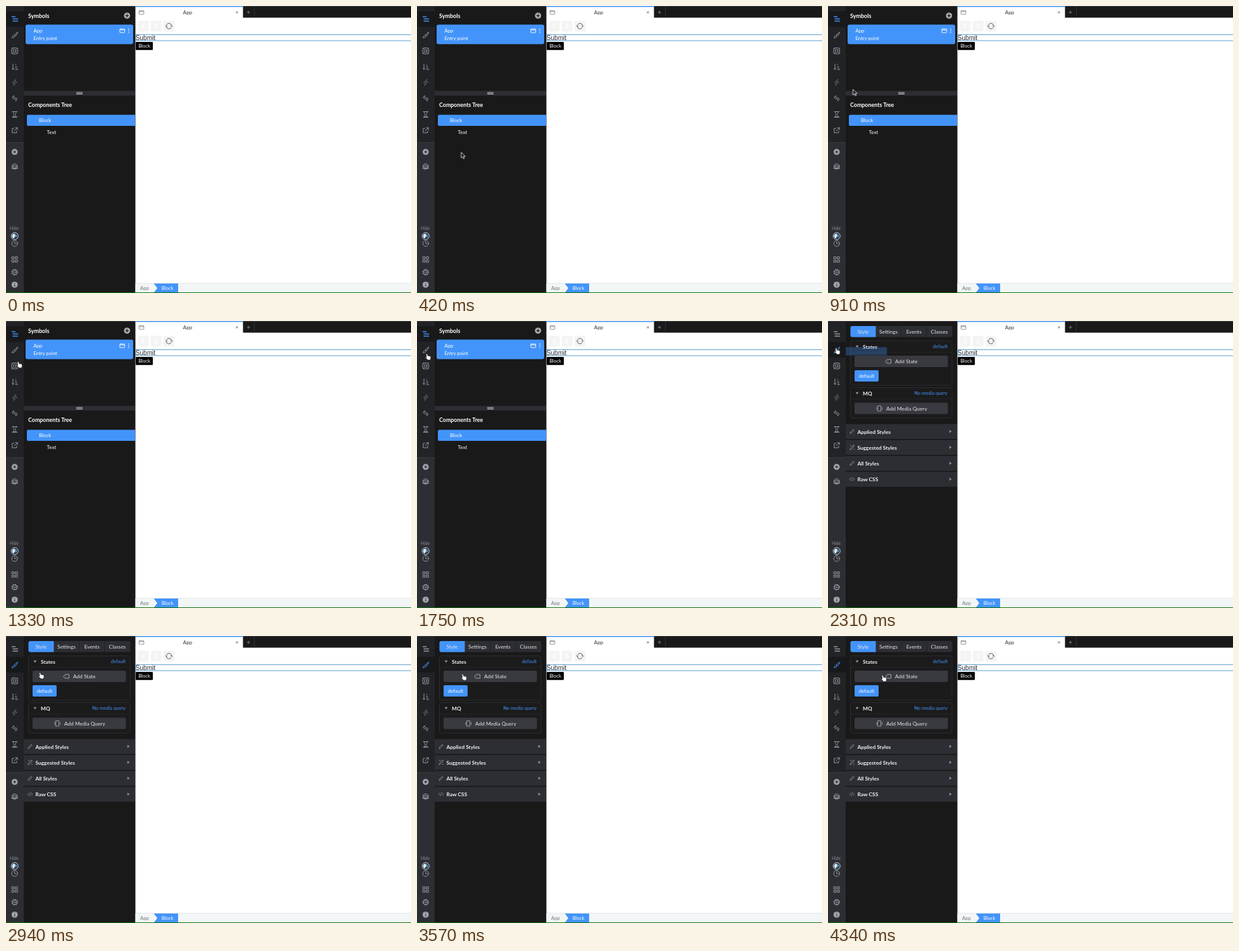
An HTML page that plays this animation: 640x455 px, repeating every 4410 ms.

```html
<!DOCTYPE html>
<html lang="en">
<head>
<meta charset="utf-8">
<title>App builder</title>
<style>
  html, body { margin: 0; width: 100%; height: 100%; overflow: hidden; background: #191919; }
  svg { display: block; width: 640px; height: 455px; }
  text { font: 8px Lato, sans-serif; fill: #fff; }
  .h { font-size: 9px; font-weight: 700; }
  .b { font-size: 8.35px; font-weight: 700; fill: #f2f2f2; }
  .s { font-size: 7.7px; }
  .m { font-size: 8.3px; fill: #e6e6e8; }
  .mid { text-anchor: middle; }
  .link { font-size: 7.55px; fill: #4394fa; text-anchor: end; }
  .blue { fill: #4394fa; }
  .bar { fill: #2d2e33; }
  .btn { fill: #393a40; }
  .box { fill: #1b1b1c; stroke: #2c2d31; }
  .dim { fill: #8b8d94; }
  .line { fill: none; stroke: currentColor; stroke-linecap: round; stroke-linejoin: round; }
  .icons { color: #989aa1; }
  .on { color: #4394fa; }

  .tree, .style, .ghost, .arrow, .hand, .pointer { animation: 4.41s infinite; }
  .tree, .style, .ghost, .arrow, .hand { animation-timing-function: step-end; }
  .tree { animation-name: tree; }
  .style { animation-name: style; }
  .ghost { animation-name: ghost; }
  .arrow { animation-name: arrow; }
  .hand { animation-name: hand; }
  .pointer { animation-name: move; animation-timing-function: ease-in-out; }

  @keyframes tree { 0% { visibility: visible } 52.37%, 100% { visibility: hidden } }
  @keyframes style { 0% { visibility: hidden } 52.37%, 100% { visibility: visible } }
  @keyframes ghost { 0% { opacity: 0 } 52.37% { opacity: .3 } 53.95% { opacity: .1 } 55.54%, 100% { opacity: 0 } }
  @keyframes arrow { 0% { visibility: hidden } 1.58% { visibility: visible } 23.8%, 100% { visibility: hidden } }
  @keyframes hand { 0% { visibility: hidden } 23.8%, 100% { visibility: visible } }
  @keyframes move {
    0%, 1.58% { transform: translate(86px, 268px) }
    9.52%, 12.7% { transform: translate(69.8px, 231.8px) }
    27%, 32% { transform: translate(19px, 64.5px) }
    46%, 57% { transform: translate(12.5px, 43px) }
    66.67%, 70% { transform: translate(53.5px, 58px) }
    90.4%, 100% { transform: translate(86px, 62.3px) }
  }
</style>
</head>
<body>
<svg viewBox="0 0 640 455">
  <defs>
    <g id="list" class="line" stroke-width="1.4"><path d="M9.5 17h5M11 20.5h7.5M11 24h7.5"/></g>
    <g id="brush" class="line">
      <path d="M18 41.5l-5 4.5 1.8 1.8 3.6-5.2zM12.5 46.5c-2 0-1.500 2.500-3.500 3.500 2.500.800 5 0 5-2"/>
    </g>
    <g id="window" class="line" stroke-width=".9"><rect x="-3.8" y="-2.900" width="7.600" height="5.800" rx=".7"/><path d="M-3.500-1.300h7"/></g>
    <path id="down" d="M-2.500-1.700h5L0 2z" fill="#8b8d94"/>
    <path id="right" d="M-1.700-2.500v5L2 0z" fill="#8b8d94"/>
    <path id="pen" class="line" stroke-width=".9" d="M-3 3l.7-2.200L2-3.200 3.200-2-1 2.300z"/>
  </defs>

  <!-- side bar -->
  <rect width="640" height="455" fill="#191919"/>
  <rect width="28" height="216" fill="#222327"/>
  <rect y="217" width="28" height="237" class="bar"/>
  <path d="M0 216.500h28" stroke="#3a3b40"/>

  <g class="tree icons">
    <rect y="8" width="28" height="25" fill="#18191b"/>
    <use href="#list" class="on"/>
    <use href="#brush"/>
  </g>
  <g class="style icons">
    <rect y="33" width="28" height="25" fill="#18191b"/>
    <use href="#list"/>
    <use href="#brush" class="on"/>
  </g>

  <g class="icons line">
    <rect x="9" y="66.500" width="9.400" height="9.400" rx="2"/>
    <circle cx="13.700" cy="71.200" r="2.200"/>
    <path d="M9.500 67l2.600 2.600M18 67l-2.600 2.600M9.500 75.500l2.600-2.600M18 75.500l-2.600-2.600" stroke-width=".8"/>
    <path d="M11 92v8.500M9.300 99l1.700 1.700 1.700-1.700M15 92.500h.5M15 95.500h1.500M15 98h2.500M15 100.700h3.500"/>
    <path d="M15.500 116.500l-5.500 5.300h3.300l-1.500 4.400 5.700-5.700h-3.300z" stroke="#65676d" stroke-width=".9"/>
    <path d="M12.500 142l-3 3 3 2.500M15 145l3 2.500-3 3M11.500 142.500l4.500 7.500"/>
    <path d="M9.800 167.500h8M9.800 176.300h8M11.500 168c0 3 1.500 3 1.500 4s-1.500 1-1.500 4M16 168c0 3-1.500 3-1.500 4s1.500 1 1.500 4M12.500 175.500h2.500"/>
    <path d="M12.500 194h-2.700v7h7v-2.700M13 198l5-5M14.700 193H18v3.300"/>
    <circle cx="13.700" cy="254.500" r="4.300"/>
    <path d="M10 253h7.500v3H10zM9 257.500h9.500M12 254.500h.1M15.500 254.500h.1"/>
    <circle cx="13.700" cy="376.500" r="4.600"/>
    <path d="M13.700 374v2.700h2.200"/>
    <path d="M9.500 397.700h3.200v3.200H9.500zM15 397.700h3.200v3.200H15zM9.500 403h3.200v3.200H9.500zM15 403h3.200v3.200H15z"/>
    <circle cx="13.700" cy="422" r="3.700" stroke-width="1.200"/>
    <circle cx="13.700" cy="422" r="4.500" stroke-width="1.300" stroke-dasharray="1.500 2.030" stroke-linecap="butt"/>
    <circle cx="13.700" cy="422" r="1.400" stroke-width=".8"/>
  </g>
  <g fill="#a3a5ab">
    <circle cx="13.700" cy="231.300" r="4.800"/>
    <circle cx="13.700" cy="441.800" r="4.900"/>
  </g>
  <path d="M11.200 231.300h5M13.700 228.800v5M13.700 441.200v3.300M13.700 438.800v1" stroke="#2d2e33" stroke-width="1.200"/>
  <text x="6" y="355" class="dim" style="font-size:6.8px">Hide</text>
  <circle cx="13.700" cy="364.700" r="5.600" fill="#27384a" stroke="#c9d3dc"/>
  <path d="M10 362.500c2-2.500 5-2 5 1l-2.500 5c-2.500-.5-3.500-3-2.500-6z" fill="#dce7ee"/>
  <path d="M14.500 361.500l3 2-1 3.500-2.500-1z" fill="#5b8fb5"/>

  <!-- symbols and component tree -->
  <g class="tree">
    <text x="35" y="18.600" class="h">Symbols</text>
    <circle cx="191.300" cy="15.300" r="4.900" fill="#a9abb0"/>
    <path d="M188.700 15.300h5.200M191.300 12.700v5.200" stroke="#191919" stroke-width="1.200"/>
    <rect x="31" y="29.500" width="170" height="31" rx="3" class="blue"/>
    <text x="43.500" y="42" class="s">App</text>
    <text x="43.500" y="54" class="s">Entry point</text>
    <use href="#window" x="183.700" y="39.300" color="#fff"/>
    <path d="M194 36.600h.01M194 39.300h.01M194 42h.01" stroke="#fff" stroke-width="1.600" stroke-linecap="round"/>
    <rect x="28" y="134.500" width="176" height="7.500" class="bar"/>
    <path d="M111 137.200h10M111 139.500h10" stroke="#d8d9db"/>
    <text x="35" y="160" class="h" style="font-size:8.9px">Components Tree</text>
    <path d="M204 172.500H35a2 2 0 0 0-2 2v13.500a2 2 0 0 0 2 2h169z" class="blue"/>
    <text x="52" y="184">Block</text>
    <text x="64.500" y="203">Text</text>
  </g>

  <!-- style panel -->
  <g class="style">
    <rect x="35.500" y="8" width="161" height="17.500" rx="3" class="bar"/>
    <path d="M115.500 8v17.500M156 8v17.500" stroke="#222327"/>
    <path d="M75.500 8H38.500a3 3 0 0 0-3 3v11.500a3 3 0 0 0 3 3h37z" class="blue"/>
    <g class="mid">
      <text x="55.500" y="19.800" class="m">Style</text>
      <text x="95.600" y="19.800" class="m">Settings</text>
      <text x="135.800" y="19.800" class="m">Events</text>
      <text x="176" y="19.800" class="m">Classes</text>
    </g>

    <rect x="35.500" y="31.500" width="160.500" height="70.500" rx="3" class="box"/>
    <path d="M36 49.500h160M36 123.500h160" stroke="#242528"/>
    <use href="#down" x="46" y="40.500"/>
    <text x="55" y="43.500" class="b">States</text>
    <text x="189" y="43.200" class="link">default</text>
    <rect x="42" y="55" width="147.500" height="18" rx="2" class="btn"/>
    <path d="M91 64l2.500-3h6v6h-6zM94.500 64h.1" class="line" color="#a3a5ab"/>
    <text x="106" y="67" class="m">Add State</text>
    <rect x="42" y="78" width="38" height="18" rx="2" class="blue"/>
    <text x="61" y="90" class="mid">default</text>

    <rect x="35.500" y="105.500" width="160.500" height="48.500" rx="3" class="box"/>
    <path d="M36 123.500h160" stroke="#242528"/>
    <use href="#down" x="46" y="114.500"/>
    <text x="55" y="117.600" class="b">MQ</text>
    <text x="189" y="117.300" class="link">No media query</text>
    <rect x="42" y="129.500" width="147.500" height="18" rx="2" class="btn"/>
    <path d="M79 134.500h4.500v8.500H79zM77 137v3.500M85.500 137v3.500" class="line" color="#a3a5ab" stroke-width=".9"/>
    <text x="92" y="141.700" class="m">Add Media Query</text>

    <path d="M28 163.500h176V187H28zM28 188.700h176v23.500H28zM28 214h176v23.500H28zM28 239.200h176v23.500H28z" class="bar"/>
    <g color="#8b8d94">
      <use href="#pen" x="38" y="175.200"/>
      <use href="#pen" x="38" y="200.800"/>
      <path d="M35.500 197.500h1.500M40 197h1.500M40.500 203.500h1" class="line"/>
      <use href="#pen" x="38" y="225.700"/>
      <path d="M36 248.800l-2 2 2 2M40 248.800l2 2-2 2M38.700 248l-1.400 5.500" class="line" stroke-width=".8"/>
    </g>
    <text x="46.500" y="178.500" class="b">Applied Styles</text>
    <text x="46.500" y="203.700" class="b">Suggested Styles</text>
    <text x="46.500" y="228.900" class="b">All Styles</text>
    <text x="46.500" y="254" class="b">Raw CSS</text>
    <use href="#right" x="193.500" y="175"/>
    <use href="#right" x="193.500" y="200.300"/>
    <use href="#right" x="193.500" y="225.500"/>
    <use href="#right" x="193.500" y="250.700"/>
    <rect x="28" y="41.500" width="65" height="13" class="blue ghost"/>
  </g>

  <!-- canvas -->
  <rect x="204.500" y="18.500" width="436" height="436" fill="#fff"/>
  <path d="M392.500 1v17.500" stroke="#303136"/>
  <rect x="204.500" width="170" height="19" fill="#fff"/>
  <path d="M0 .5h204M375 .5h265" stroke="#3c4045"/>
  <path d="M204.500 .7h170" stroke="#4394fa" stroke-width="1.400"/>
  <use href="#window" x="214" y="10.300" color="#85878c"/>
  <text x="287" y="12.800" class="mid" style="fill:#303236">App</text>
  <path d="M363.300 8.500l3.200 3.200M366.500 8.500l-3.200 3.200" stroke="#666" stroke-width=".9"/>
  <path d="M380.700 10h5M383.200 7.500v5" stroke="#85878c" stroke-width=".9"/>
  <g fill="#f4f4f4">
    <rect x="208.500" y="23.500" width="17" height="17" rx="2"/>
    <rect x="228.700" y="23.500" width="17" height="17" rx="2"/>
    <rect x="249" y="23.500" width="17" height="17" rx="2"/>
  </g>
  <path d="M218.500 28.500l-3.500 3.500 3.500 3.500M235.500 28.500l3.500 3.500-3.500 3.500" class="line" color="#fff" stroke-width="1.500"/>
  <path d="M253.300 32.500a4.200 4.200 0 0 0 8 1.300M261.700 31a4.200 4.200 0 0 0-8-1M252.300 31l1 1.700 1.500-1.200M263 32.500l-1.200-1.700-1.500 1.200" class="line" color="#4a4c50" stroke-width=".9"/>
  <text x="204.700" y="53.500" style="font:10.1px 'Liberation Sans',Arial,sans-serif;fill:#2b2f3a">Submit</text>
  <path d="M640 45.500H205v9.500h435" fill="none" stroke="#5b9fc9"/>
  <rect x="205" y="57" width="27" height="12.700" rx="1" fill="#000"/>
  <text x="218.500" y="66" class="s mid">Block</text>

  <rect x="204.500" y="439.500" width="436" height="15" fill="#f3f6f7"/>
  <path d="M205 439.500h435" stroke="#cfd3d5" stroke-dasharray="1 1"/>
  <text x="212" y="450" class="s" style="fill:#74777c">App</text>
  <path d="M232 440l6 7-6 7h2.500l6-7-6-7z" fill="#fff"/>
  <path d="M233.500 440H272v14.500h-38.500l5.500-7.200z" class="blue"/>
  <text x="255" y="450" class="s mid">Block</text>
  <path d="M0 454.500h640" stroke="#08700c"/>

  <!-- pointer -->
  <g class="pointer">
    <path class="arrow" d="M0 0v9l2.100-1.900 1.500 3.300 1.500-.7-1.500-3.200h2.800z" fill="#111" stroke="#fff" stroke-width=".8"/>
    <path class="hand" d="M-.7.300C-.2-.5.800-.3 1.100.6l.9 2.700c.6-.5 1.300-.3 1.600.2.600-.4 1.200-.1 1.500.4.700-.3 1.300.1 1.400.8.300 2 .1 3.200-.9 5.300H1.600C.3 8.200-.7 7-2 6.200c-.6-.9.300-1.500 1.100-1l.7.500-.8-4c-.1-.6 0-1.100.3-1.400z" fill="#fff" stroke="#111" stroke-width=".8" stroke-linejoin="round"/>
  </g>
</svg>
</body>
</html>
```
